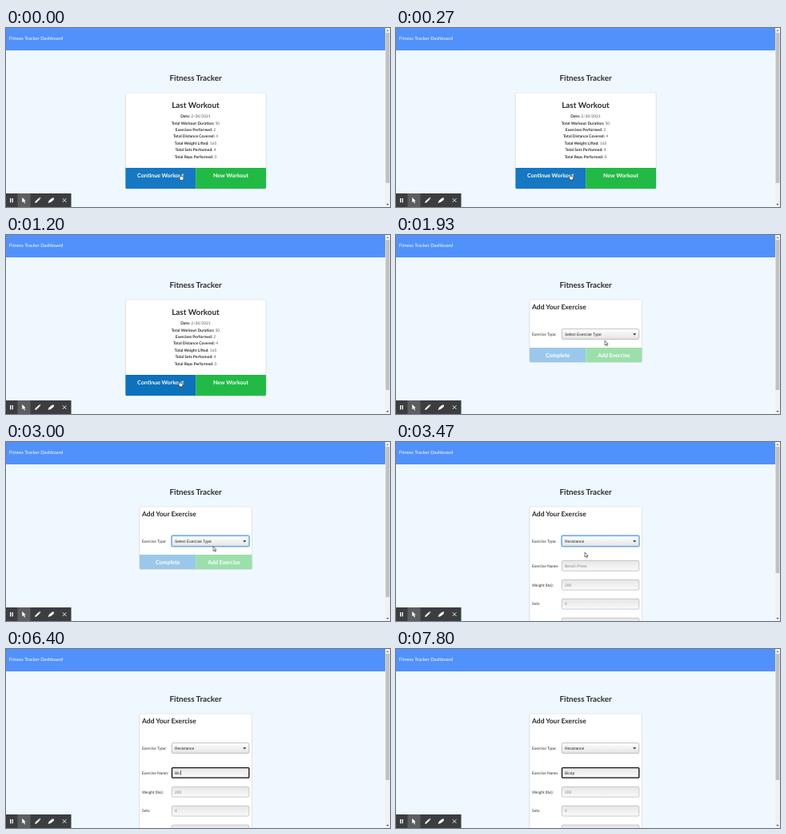
An HTML page that plays this animation: 480 by 224 pixels, repeating every 8000 ms.

```html
<!DOCTYPE html>
<html lang="en">
<head>
<meta charset="utf-8">
<title>Fitness Tracker</title>
<style>
  html, body { margin: 0; width: 100%; height: 100%; overflow: hidden; background: #f0f8ff; }
  svg { display: block; width: 100vw; height: 100vh; }
  text { font-family: Lato, sans-serif; font-size: 4.95px; fill: #2b2c2d; text-rendering: geometricPrecision; white-space: pre; }
  .bold { font-weight: 700; }
  .mid { text-anchor: middle; }
  .field { font-family: "Liberation Sans", Arial, sans-serif; font-size: 4.92px; fill: #222; }
  .hint { fill: #858585; }
  .button { font-size: 7.05px; fill: #fff; }
</style>
</head>
<body>
<svg id="stage" viewBox="0 0 480 224">
  <defs>
    <linearGradient id="selectFill" x2="0" y2="1"><stop stop-color="#fff"/><stop offset="1" stop-color="#e4e4e4"/></linearGradient>
    <linearGradient id="inputFill" x2="0" y2="1"><stop stop-color="#e6e6e6"/><stop offset="1" stop-color="#fafafa"/></linearGradient>
  </defs>
</svg>
<script>
const LOOP = 8000, STEP = 200 / 3;
const stage = document.getElementById('stage');

const rect = (x, y, w, h, fill, extra = '') =>
  `<rect x="${x}" y="${y}" width="${w}" height="${h}" fill="${fill}" ${extra}/>`;
const text = (x, y, content, cls = '', extra = '') =>
  `<text x="${x}" y="${y}" class="${cls}" ${extra}>${content}</text>`;
const path = (d, fill, extra = '') => `<path d="${d}" fill="${fill}" ${extra}/>`;
const group = (id, content) => `<g id="${id}">${content}</g>`;

const card = (x, y, w, h) =>
  rect(x - .5, y + .3, w + 1, h + .8, '#c9d0d6', 'rx="1.8" opacity=".55"') +
  rect(x, y, w, h, '#fff', 'rx="1.5" stroke="#d0d4d8" stroke-width=".5"');

// A pair of buttons joined at the middle of a card, rounded at the outer bottom corners.
const buttonPair = (x, y, w, h, baseline, left, right) => {
  const half = w / 2, r = 1.5;
  return path(`M${x} ${y}h${half}v${h}h${r - half}q${-r} 0 ${-r} ${-r}z`, left.color, `id="${left.id}"`) +
    path(`M${x + half} ${y}h${half}v${h - r}q0 ${r} ${-r} ${r}h${r - half}z`, right.color) +
    text(x + half / 2, baseline, left.label, 'bold mid button') +
    text(x + half * 1.5, baseline, right.label, 'bold mid button');
};

const inputBox = y => rect(207.3, y, 96.5, 12.8, 'url(#inputFill)', 'rx="1.3" stroke="#b5b5b5" stroke-width=".7"');
const inputRow = (y, label, hint) =>
  text(170, y + 8.1, label) + inputBox(y) + text(211, y + 8.1, hint, 'field hint');

const chrome = rect(0, 0, 480, 224, '#f0f8ff') + rect(0, 0, 474, 28, '#5191fb') +
  text(3.7, 14.6, 'Fitness Tracker Dashboard', '', 'style="fill:#fff;font-size:5.85px"') +
  text(237, 66.3, 'Fitness Tracker', 'bold mid', 'style="font-size:9.8px"');

const scrollbar = rect(474, 0, 6, 224, '#f1f1f1') +
  rect(474.6, 6, 4.8, 188, '#c1c1c1', 'id="thumb"') +
  path('M475.4 4L477 2.2 478.6 4z', '#777') + path('M475.4 220L477 221.8 478.6 220z', '#444');

const stats = [
  ['Date', '2/28/2021'], ['Total Workout Duration', 50], ['Exercises Performed', 2],
  ['Total Distance Covered', 4], ['Total Weight Lifted', 165],
  ['Total Sets Performed', 4], ['Total Reps Performed', 0]
];
const summary = card(149.4, 81, 175.6, 120) +
  text(237, 99.8, 'Last Workout', 'bold mid', 'style="font-size:9.9px"') +
  stats.map(([name, value], i) => text(237, 112.2 + i * 8.4,
    `<tspan class="bold">${name}:</tspan><tspan fill="#555"> ${value}</tspan>`, 'mid')).join('') +
  buttonPair(149.4, 175, 175.6, 26, 186.5,
    { id: 'continue', label: 'Continue Workout', color: '#1678c2' },
    { label: 'New Workout', color: '#21ba45' });

const closedForm = card(167, 81, 140.5, 78) +
  buttonPair(167, 141, 140.5, 18, 152.8,
    { id: 'complete', label: 'Complete', color: '#9bc8ea' },
    { label: 'Add Exercise', color: '#9be0ab' });

const openForm = card(167, 81, 140.5, 200) +
  inputRow(148.5, 'Exercise Name:', '') + inputRow(172.4, 'Weight (lbs):', '200') +
  inputRow(196.3, 'Sets:', '4') + inputRow(220.2, 'Reps:', '') +
  rect(207.5, 148.6, 96.3, 12.6, 'none', 'id="inputFocus" rx="1" stroke="#151515" stroke-width="1.3"') +
  text(211, 156.6, '', 'field', 'id="typed"') +
  rect(0, 152, .6, 5.8, '#111', 'id="caret"');

const selectRow = text(170, 92.6, 'Add Your Exercise', 'bold', 'style="font-size:8.5px"') +
  text(170, 126, 'Exercise Type:') +
  rect(206.8, 117, 97.4, 13.8, 'none', 'id="selectFocus" rx="2" stroke="#9cc9ef" stroke-width="1.8"') +
  rect(207.3, 117.6, 96.5, 12.8, 'url(#selectFill)', 'id="select" rx="1.5" stroke="#aaa" stroke-width=".7"') +
  text(211, 125.8, '', 'field', 'id="choice"') + path('M296 123.2h4.4l-2.2 2.3z', '#333');

const toolbar = rect(0, 207, 81.5, 17, '#3b3d3f') + rect(14.5, 207, 16, 17, '#5c5e60') +
  rect(5, 213, 1.3, 5.4, '#fff') + rect(7.5, 213, 1.3, 5.4, '#fff') +
  path('M20.2 212l4.6 4.4-2 .1 1.2 2.4-1 .5-1.2-2.5-1.6 1.4z', '#fff') +
  path('M36.2 219l.4-1.9 4.4-4.4 1.5 1.5-4.4 4.4zM41.4 212.3l.7-.6 1.5 1.5-.7.6z', '#fff') +
  path('M52.5 219l1.2-3 3.8-3.2 2.4-.2-.2 2.3-3.8 3.2z', '#fff') +
  path('M70.8 213.3l4.6 4.6m0-4.6l-4.6 4.6', 'none', 'stroke="#fff" stroke-width=".9"');

const outline = 'stroke="#222" stroke-width=".6" stroke-linejoin="round"';
const pointer = group('pointer',
  group('hand', path('M-.5 .4q.6-.8 1.2 0v2.4l2.6.6q.8.2.7 1l-.5 3h-3.2l-2.2-3q.3-.8 1.4.1z', '#fff', outline)) +
  group('arrow', path('M0 0v6l1.4-1.2 1 2 .9-.4-1-2h1.8z', '#fff', outline)) +
  group('beam', path('M-1 0h2M0 0v6M-1 6h2', 'none', 'stroke="#333" stroke-width=".6"')));

stage.insertAdjacentHTML('beforeend', chrome + group('summary', summary) +
  group('form', group('closed', closedForm) + group('open', openForm) + selectRow) +
  scrollbar + toolbar + pointer);

const el = Object.fromEntries([...stage.querySelectorAll('[id]')].map(node => [node.id, node]));
const show = (name, visible) => el[name].style.display = visible ? '' : 'none';

// Each stop: time, x, y of the pointer tip.
const route = [
  [0, 218, 183], [130, 217.6, 182.7], [733, 217.6, 182.7], [800, 217, 182.4], [1600, 217, 182.4],
  [1933, 261, 132], [2200, 301, 122], [2470, 298, 123], [2730, 279, 150], [3000, 259, 130.5],
  [3270, 236, 138], [3667, 236, 138], [4000, 226, 147], [4270, 221, 149.5]
];
function pointerAt(time) {
  const next = route.findIndex(stop => stop[0] > time);
  if (next < 0) return route.at(-1).slice(1);
  const [t0, x0, y0] = route[next - 1], [t1, x1, y1] = route[next];
  const k = (time - t0) / (t1 - t0);
  return [x0 + (x1 - x0) * k, y0 + (y1 - y0) * k];
}

// Typing: start time, text, caret x.
const typing = [[0, '', 211], [5600, 'B', 214.4], [6000, 'Bi', 215.5], [6400, 'Bic', 218],
  [6670, 'Bice', 220.8], [7130, 'Bicep', 223.6], [7330, 'Bicep ', 225]];

function draw(time) {
  const formShown = time >= 1330, expanded = time >= 3400, inputFocused = time >= 4530;
  const selectFocused = time >= 2330 && !inputFocused;
  show('summary', !formShown);
  show('form', formShown);
  show('closed', !expanded);
  show('open', expanded);
  el.thumb.setAttribute('height', expanded ? 158 : 188);
  el.continue.setAttribute('fill',
    time < 1000 ? '#1678c2' : time < 1070 ? '#1871b3' : time < 1200 ? '#1a69a4' : '#0d71bb');

  el.choice.textContent = expanded ? 'Resistance' : 'Select Exercise Type';
  show('selectFocus', selectFocused);
  el.select.setAttribute('stroke', selectFocused ? '#4a90d0' : '#aaa');

  const [, word, caretX] = typing.findLast(entry => time >= entry[0]);
  el.typed.textContent = word || 'Bench Press';
  el.typed.classList.toggle('hint', !word);
  show('inputFocus', inputFocused);
  show('caret', inputFocused && (time < 5070 || time >= 5530 && time < 7800));
  el.caret.setAttribute('x', caretX);

  const [x, y] = pointerAt(Math.floor(time / STEP + .1) * STEP);
  const beam = expanded && y > 148;
  show('pointer', time < 4670);
  show('hand', !formShown);
  show('beam', beam);
  show('arrow', formShown && !beam);
  el.pointer.setAttribute('transform', `translate(${x} ${y})`);
}

const start = performance.now();
function tick() {
  draw((performance.now() - start) % LOOP);
  requestAnimationFrame(tick);
}
tick();
</script>
</body>
</html>
```
